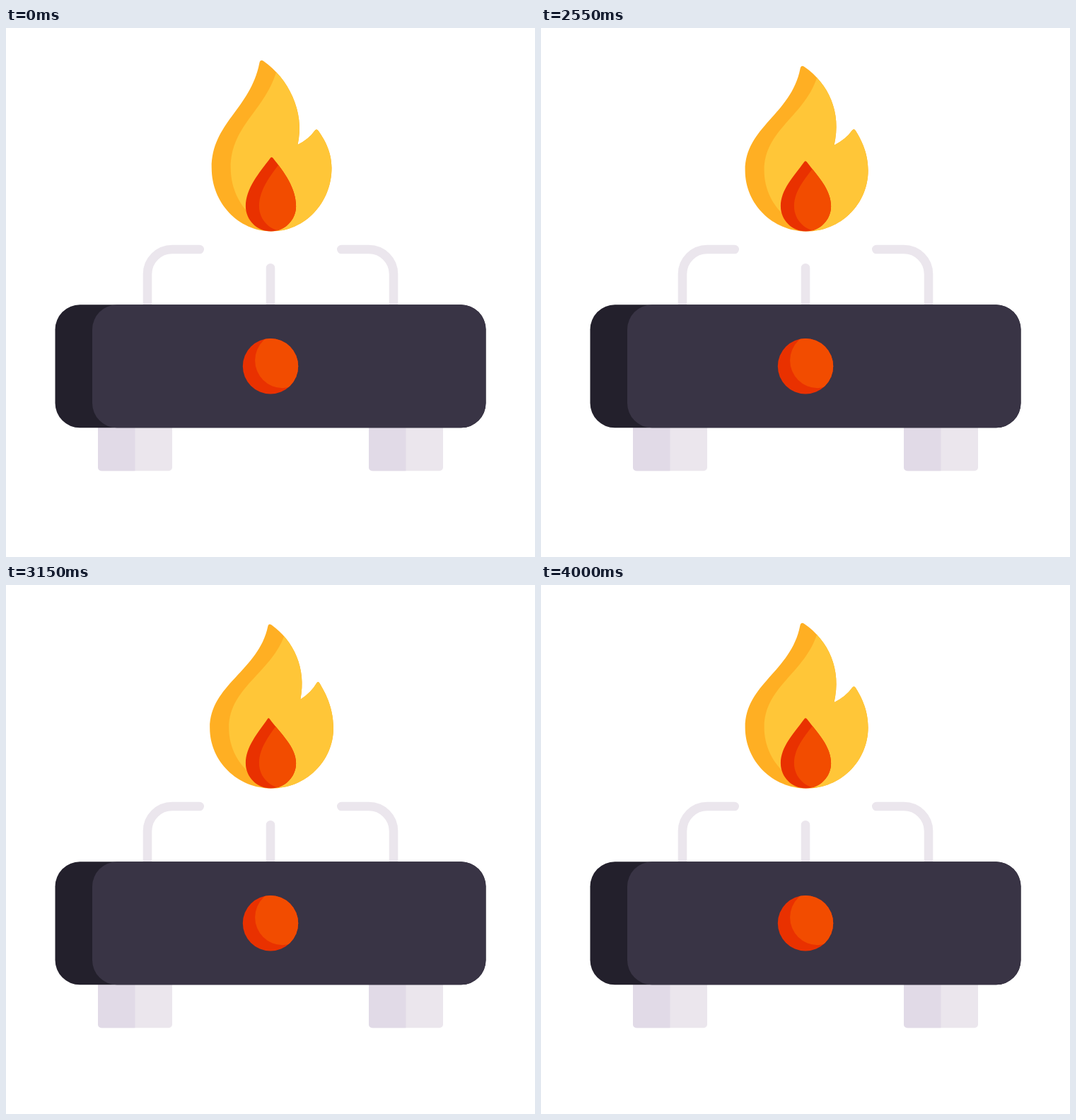
An HTML page with a canvas that plays this animation: 748 px wide and 748 px high, repeating every 4.52 s.

```html
<!DOCTYPE html>
<html lang="en">
<head>
<meta charset="utf-8">
<title>Camp stove</title>
<style>
  html, body { margin: 0; width: 100%; height: 100%; overflow: hidden; background: #fff; }
  canvas { display: block; width: 748px; height: 748px; }
</style>
</head>
<body>
<canvas id="stage" width="748" height="748"></canvas>
<script>
const ctx = document.getElementById('stage').getContext('2d');
const LOOP = 4520, START = 2020, STEP = 25, LAST = 79, CYCLE = 500;
const MID = 374, BASE = 287.5, ROUND = 0.552;

const color = {
  body: '#393445', bodyDark: '#23202c',
  metal: '#ebe6ed', metalDark: '#e1dae7',
  flame: '#ffc638', flameDark: '#ffaf23',
  core: '#f24c00', coreDark: '#e93100'
};

// tip, notch, tongue and core are points; rise and fall are the handles
// on both sides of the tip, brow is the handle above the notch
const calm = {
  tip: [367.5, 51.5], rise: [-14, 71], fall: [39, 27],
  notch: [414.5, 166], brow: [11, -47], tongue: [442.5, 141.5],
  core: [374, 187], round: [6]
};
const rest = { ...calm, tip: [359.5, 43.5], notch: [412.5, 165], tongue: [439, 141.5], core: [375.5, 181.5] };
const wide = {
  tip: [395, 66], rise: [-15, 47], fall: [15, 17],
  notch: [428, 135], brow: [-5, -23], tongue: [433.5, 97],
  core: [354, 189], round: [0]
};
const tall = {
  tip: [383, 46], rise: [-40, 29], fall: [14, 43],
  notch: [452, 175], brow: [-22, -43], tongue: [458.5, 187],
  core: [363, 172], round: [0]
};
const sleek = {
  tip: [374, 45.5], rise: [-35, 30], fall: [10, 40],
  notch: [454.5, 191], brow: [-11, -45], tongue: [456.5, 179.5],
  core: [374, 183], round: [0]
};

// Combine the matching numbers of several poses
function combine(poses, fn) {
  const out = {};
  for (const name in poses[0]) {
    out[name] = poses[0][name].map((_, i) => fn(...poses.map(p => p[name][i])));
  }
  return out;
}

const keys = [
  { at: 0, pose: calm },
  { at: 125, pose: combine([calm, wide], (a, b) => a + (b - a) * 0.14) },
  { at: 225, pose: wide },
  { at: 325, pose: tall },
  { at: 425, pose: sleek },
  { at: 475, pose: calm }
];

// Monotone speed where two slopes meet: none at a turning point
const speed = (a, b) => a * b <= 0 ? 0 : 2 * a * b / (a + b);

function poseAt(phase) {
  const n = keys.length;
  const i = keys.filter(k => k.at <= phase).length - 1;
  const near = [-1, 0, 1, 2].map(d => keys[(i + d + n) % n]);
  const [s0, s1, s2] = [0, 1, 2].map(j => (near[j + 1].at - near[j].at + CYCLE) % CYCLE);
  const u = (phase - keys[i].at) / s1, v = 1 - u;
  return combine(near.map(k => k.pose), (a, b, c, d) => {
    const slope = (c - b) / s1;
    const from = speed((b - a) / s0, slope) * s1;
    const to = speed(slope, (d - c) / s2) * s1;
    return v * v * ((1 + 2 * u) * b + u * from) + u * u * ((1 + 2 * v) * c - v * to);
  });
}

// Point at distance d from p along (dx, dy)
function along([x, y], [dx, dy], d) {
  const k = d / Math.hypot(dx, dy);
  return [x + dx * k, y + dy * k];
}

const add = (p, q) => [p[0] + q[0], p[1] + q[1]];

// Left edge: bowl from the base up to the widest point, then on to the tip
function leftEdge(cx, w, y, lift, handle, end) {
  const path = new Path2D();
  path.moveTo(cx, BASE);
  path.bezierCurveTo(cx - w * ROUND, BASE, cx - w, y + (BASE - y) * ROUND, cx - w, y);
  path.bezierCurveTo(cx - w, lift, ...handle, ...end);
  return path;
}

function closeBowl(path, cx, w, y) {
  path.bezierCurveTo(cx + w, y + (BASE - y) * ROUND, cx + w * ROUND, BASE, cx, BASE);
  path.closePath();
}

// The lower the tip, the wider the flame
function flameShape({ tip, rise, fall, notch, brow, tongue, round: [r] }) {
  const squat = (tip[1] + r / 3 - 46) / 20;
  const cx = 375.6, w = 85 + 5.2 * squat, y = 198 + 9 * squat;
  const left = leftEdge(cx, w, y, y - 0.41 * (y - tip[1]), add(tip, rise), along(tip, rise, r));
  const full = new Path2D(left);
  full.quadraticCurveTo(...tip, ...along(tip, fall, r));
  full.bezierCurveTo(...add(tip, fall), ...add(notch, brow), ...notch);

  const [nx, ny] = notch, [ux, uy] = tongue;
  const bend = [nx + (ux - nx) * 0.6, ny + (uy - ny) * 0.35];
  const drop = [(cx + w - ux) * 0.42, (y - uy) * 0.23];
  full.quadraticCurveTo(...bend, ...along(tongue, [bend[0] - ux, bend[1] - uy], r * 0.8));
  full.quadraticCurveTo(...tongue, ...along(tongue, drop, r * 0.8));
  full.bezierCurveTo(...add(tongue, drop), cx + w, y - 0.45 * (y - uy), cx + w, y);
  closeBowl(full, cx, w, y);
  return { left, full };
}

// The core leans with its tip
function coreShape({ core, round: [r] }) {
  const cx = 374.5, w = 35.6, y = 252;
  const lean = (cx - core[0]) / 20, lift = y - 0.36 * (y - core[1]);
  const rise = [-17 + 7 * lean, 23], fall = [18 - 7 * lean, 23];
  const left = leftEdge(cx, w, y, lift, add(core, rise), along(core, rise, r / 2));
  const full = new Path2D(left);
  full.quadraticCurveTo(...core, ...along(core, fall, r / 2));
  full.bezierCurveTo(...add(core, fall), cx + w, lift, cx + w, y);
  closeBowl(full, cx, w, y);
  return { left, full };
}

// Fill a shape, then its lit part: everything right of its shifted left edge
function shaded({ left, full }, shift, dark, light) {
  ctx.fillStyle = dark;
  ctx.fill(full);
  const lit = new Path2D(left);
  lit.lineTo(700, 0);
  lit.lineTo(700, BASE);
  lit.closePath();
  ctx.save();
  ctx.clip(full);
  ctx.translate(shift, 0);
  ctx.fillStyle = light;
  ctx.fill(lit);
  ctx.restore();
}

function box(x, y, w, h, radii, fill) {
  ctx.beginPath();
  ctx.roundRect(x, y, w, h, radii);
  ctx.fillStyle = fill;
  ctx.fill();
}

function disc(x, y, r) {
  const path = new Path2D();
  path.arc(x, y, r, 0, Math.PI * 2);
  return path;
}

function leg(x) {
  box(x, 560, 105, 66.3, [0, 0, 5, 5], color.metal);
  box(x, 560, 52.5, 66.3, [0, 0, 0, 5], color.metalDark);
}

function burner() {
  ctx.strokeStyle = color.metal;
  ctx.lineWidth = 12.6;
  ctx.lineCap = 'round';
  ctx.beginPath();
  for (const side of [-1, 1]) {
    const x = d => MID + side * d;
    ctx.moveTo(x(100.3), 313);
    ctx.lineTo(x(139), 313);
    ctx.arcTo(x(174), 313, x(174), 348, 35);
    ctx.lineTo(x(174), 400);
  }
  ctx.moveTo(MID, 339.3);
  ctx.lineTo(MID, 400);
  ctx.stroke();
}

function knob() {
  const face = disc(MID, 478.3, 39.2);
  ctx.fillStyle = color.coreDark;
  ctx.fill(face);
  ctx.save();
  ctx.clip(face);
  ctx.fillStyle = color.core;
  ctx.fill(disc(MID + 17.3, 470, 39.2));
  ctx.restore();
}

function stove() {
  burner();
  leg(130);
  leg(513);
  box(69.5, 391.3, 609, 174, 35, color.bodyDark);
  box(122, 391.3, 556.5, 174, 35, color.body);
  knob();
}

function draw(t) {
  const step = Math.min(LAST, Math.floor((t - START) / STEP));
  const pose = t < START ? rest : poseAt(step * STEP % CYCLE);
  ctx.fillStyle = '#fff';
  ctx.fillRect(0, 0, 748, 748);
  stove();
  shaded(flameShape(pose), 27, color.flameDark, color.flame);
  shaded(coreShape(pose), 19, color.coreDark, color.core);
}

const begin = performance.now();
function tick() {
  draw((performance.now() - begin) % LOOP);
  requestAnimationFrame(tick);
}
tick();
</script>
</body>
</html>
```
